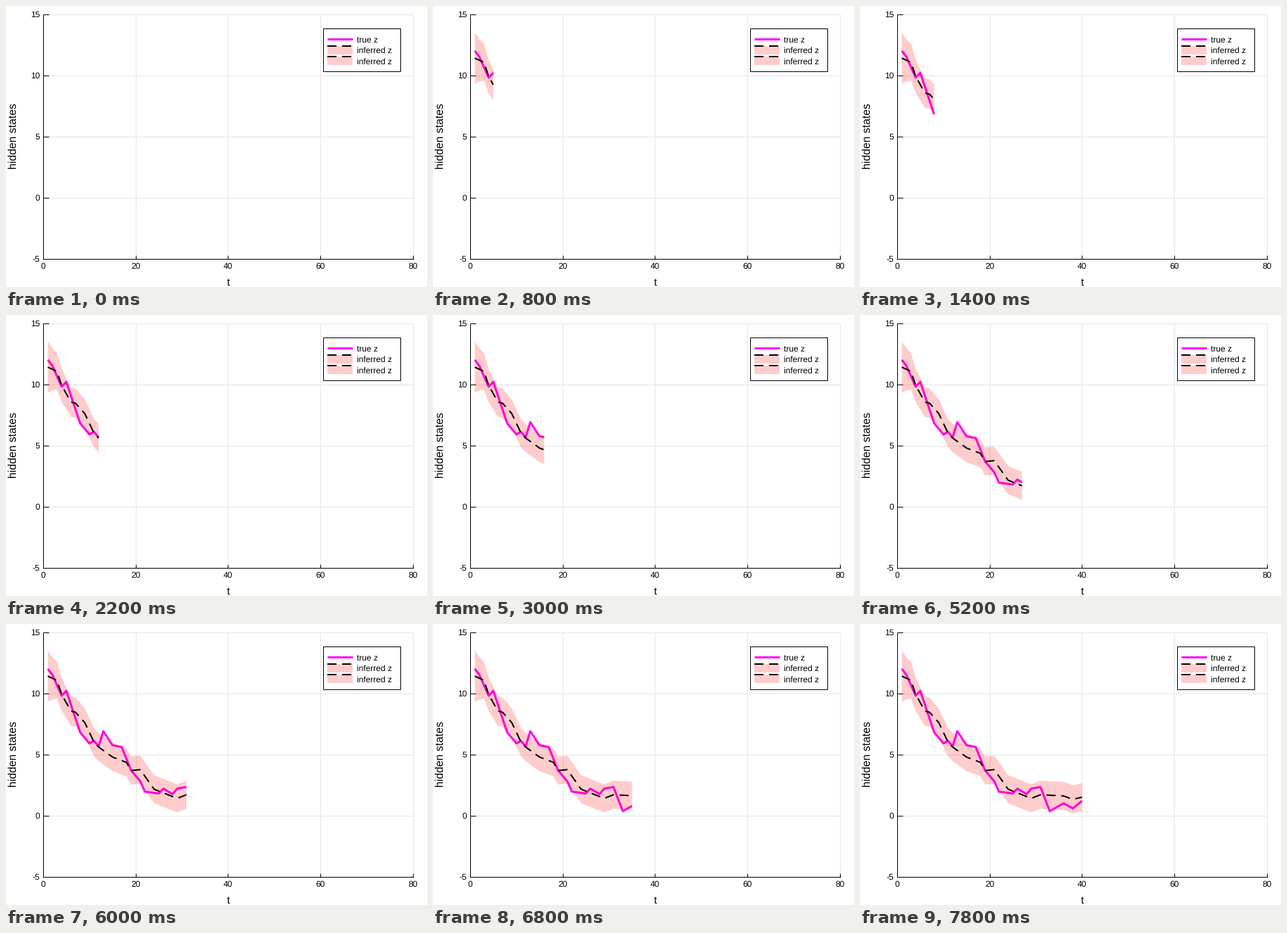
Recreate the animation shown at these times as a matplotlib script. Size 600 by 400 pixels, loop 8000 ms.

```python
import numpy as np
import matplotlib.pyplot as plt
from matplotlib.animation import FuncAnimation
from matplotlib.patches import Polygon, Rectangle

W, H, DPI = 600, 400, 100
PT = 72 / DPI  # points per pixel
LEFT, RIGHT, TOP, BOTTOM = 53, 580, 11.6, 359.6
STEPS = 40
MAGENTA, RED, GRID = "#ff00ff", "#ff0000", "#e5e5e5"
DASH = (0, (6.5, 4))

plt.rcParams["font.family"] = "Liberation Sans"
plt.rcParams["text.hinting"] = "none"


def path(*turns):
    """Straight runs between (time, value) turning points."""
    return np.interp(t, *zip(*turns))


t = np.arange(1, STEPS + 1)
true_z = path((1, 12), (2, 11.5), (4, 9.8), (5, 10.2), (8, 6.8), (10, 5.9),
              (11, 6.1), (12, 5.65), (13, 6.9), (15, 5.75), (17, 5.6),
              (19, 3.7), (21, 2.8), (22, 1.95), (25, 1.8), (26, 2.2),
              (28, 1.75), (29, 2.2), (31, 2.33), (33, 0.35), (36, 1),
              (38, 0.58), (40, 1.2))
mean_z = path((1, 11.4), (3, 11.05), (4, 9.9), (6, 8.55), (7, 8.45),
              (9, 7.6), (11, 6), (12, 5.6), (15, 4.78), (18, 4.35),
              (19, 3.68), (21, 3.75), (24, 2.15), (29, 1.4), (31, 1.7),
              (36, 1.6), (38, 1.32), (40, 1.5))
spread = 1.15 + 0.95 * np.exp(-0.5 * (t - 1))


def px(v):
    return LEFT + v * (RIGHT - LEFT) / 80


def py(v):
    return BOTTOM - (v + 5) * (BOTTOM - TOP) / 20


fig = plt.figure(figsize=(W / DPI, H / DPI), dpi=DPI, facecolor="white")
ax = fig.add_axes([0, 0, 1, 1])
ax.set_xlim(0, W)
ax.set_ylim(H, 0)
ax.axis("off")


def line(x, y, color="black", width=1, z=2, **kw):
    return ax.plot(x, y, color=color, lw=width * PT, zorder=z,
                   solid_capstyle="butt", dash_capstyle="butt",
                   solid_joinstyle="round", dash_joinstyle="round", **kw)[0]


def label(x, y, text, size, **kw):
    ax.text(x, y, text, fontsize=size * PT, va="baseline", zorder=9, **kw)


# Grid, ticks and axis lines
for v in range(0, 81, 20):
    x = round(px(v))
    line([x, x], [TOP, BOTTOM], GRID, z=1)
    line([x, x], [BOTTOM, BOTTOM - 5])
    label(x + 0.3, 374, str(v), 12, ha="center")
for v in range(-5, 16, 5):
    y = py(v)
    line([LEFT, RIGHT], [y, y], GRID, z=1)
    line([LEFT, LEFT + 8], [y, y])
    label(48, y + 4.4, str(v), 12, ha="right")
line([LEFT, LEFT], [TOP, BOTTOM + 1])
line([LEFT, RIGHT + 1], [BOTTOM, BOTTOM])
label(317, 397.5, "t", 15, ha="center")
label(14.5, 185.5, "hidden states", 15.8, ha="center", rotation=90,
      rotation_mode="anchor")

# Legend
ax.add_patch(Rectangle((452, 32), 110, 61, fc="white", ec="black", lw=PT,
                       zorder=6))
line([458, 494], [47.4, 47.4], MAGENTA, 3, z=7)
label(500, 52, "true z", 12)
for y, base in ((57, 67), (72, 83)):
    ax.add_patch(Rectangle((458, y), 36, 12, fc=RED, alpha=0.2, lw=0,
                           zorder=7))
    line([458, 494], [y, y], width=2, z=8, ls=DASH)
    label(500, base, "inferred z", 12)

# Growing curves; the band lies over the true path
true_line = line([], [], MAGENTA, 3, z=3)
band = ax.add_patch(Polygon(np.zeros((3, 2)), fc=RED, alpha=0.2, lw=0,
                            zorder=4))
mean_line = line([], [], width=2, z=5, ls=DASH)


def draw(i):
    n = i + 1
    x, m, s = px(t[:n]), mean_z[:n], spread[:n]
    true_line.set_data(x, py(true_z[:n]))
    mean_line.set_data(x, py(m))
    edge = np.concatenate([py(m + s), py(m - s)[::-1]])
    band.set_xy(np.column_stack([np.concatenate([x, x[::-1]]), edge]))
    for artist in (true_line, mean_line, band):
        artist.set_visible(n > 1)
    return true_line, band, mean_line


anim = FuncAnimation(fig, draw, frames=STEPS, interval=200, repeat=True,
                     repeat_delay=0)
plt.show()
```
